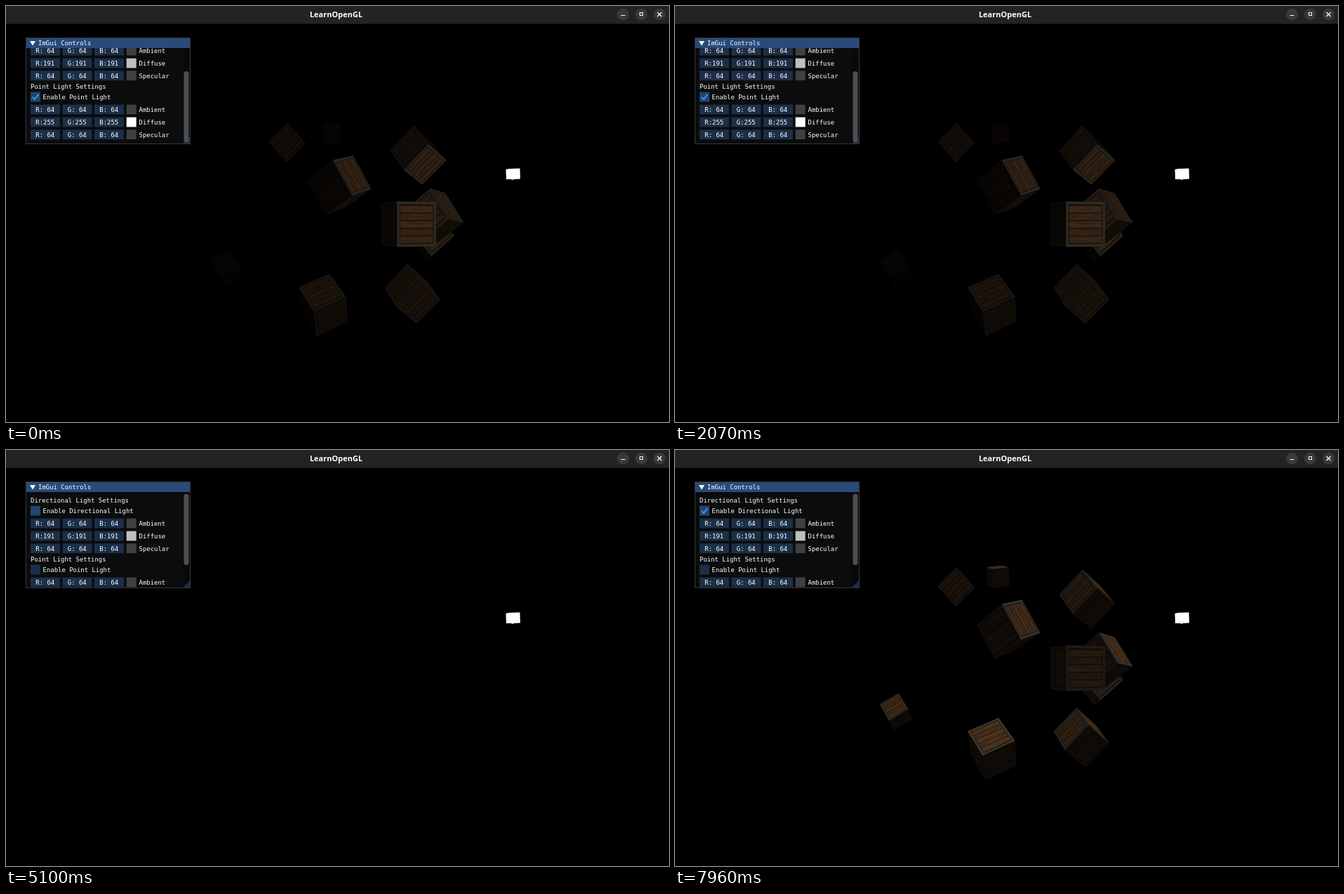
These frames come from a looping animation (945x593 px, 8000 ms). An HTML page with a canvas:

```html
<!DOCTYPE html>
<html>
<head>
<meta charset="utf-8">
<style>
html, body { margin: 0; height: 100%; overflow: hidden; background: #000; }
canvas { display: block; }
</style>
</head>
<body>
<canvas id="stage" width="945" height="593"></canvas>
<script>
const g = document.getElementById('stage').getContext('2d');
const LOOP = 8000;

// Scene: crates at p, each turned 20 degrees more than the one before
const crates = [
  [0, 0, 0], [2, 5, -15], [-1.5, -2.2, -2.5], [-3.8, -2, -12.3], [2.4, -.4, -3.5],
  [-1.7, 3, -7.5], [1.3, -2, -2.5], [1.5, 2, -2.5], [1.5, .2, -1.5], [-1.3, 1, -1.5]
].map((p, i) => ({ p, axes: rotation(i * Math.PI / 9) }));
const lamp = [1.45, 1, 2], sun = unit([.2, 1, .3]);
const yaw = 16 * Math.PI / 180, C = Math.cos(yaw), S = Math.sin(yaw);
const WOOD = [86, 58, 35], STEEL = [72, 66, 57];

function dot(a, b) { return a[0] * b[0] + a[1] * b[1] + a[2] * b[2]; }
function unit(a) { const l = Math.hypot(...a); return a.map(x => x / l); }

// Rotated x, y and z axes of a crate
function rotation(angle) {
  const n = unit([1, .3, .5]), c = Math.cos(angle), s = Math.sin(angle);
  return [0, 1, 2].map(a => {
    const e = [0, 0, 0];
    e[a] = 1;
    const cross = [n[1] * e[2] - n[2] * e[1], n[2] * e[0] - n[0] * e[2], n[0] * e[1] - n[1] * e[0]];
    return e.map((x, i) => c * x + s * cross[i] + (1 - c) * n[a] * n[i]);
  });
}

// Camera space: right, up, depth
const turn = ([x, y, z]) => [x * C + z * S, y, x * S - z * C];
function view(p) {
  const [r, y, d] = turn(p);
  return [r + 1.72, y, d + 11.05];
}
function project(p) {
  const [r, y, d] = view(p);
  return [472.5 + 643 * r / d, 311 - 680 * y / d];
}

function poly(points, color) {
  g.fillStyle = color;
  g.beginPath();
  for (const [x, y] of points) g.lineTo(x, y);
  g.fill();
}

function light(mode, n, at) {
  if (mode === 'sun') return .2 + .75 * Math.max(0, dot(n, sun));
  const to = lamp.map((x, i) => x - at[i]), d = Math.hypot(...to);
  return (.22 + Math.max(0, dot(n, to) / d)) / (1 + .09 * d + .032 * d * d);
}

function drawFace(crate, axis, sign, mode) {
  const n = crate.axes[axis].map(x => x * sign);
  const mid = crate.p.map((x, i) => x + n[i] / 2);
  if (dot(turn(n), view(mid)) >= 0) return;
  const level = light(mode, n, mid);
  const [U, V] = [[1, 2], [0, 2], [0, 1]][axis].map(a => crate.axes[a]);
  const at = (u, v) => project(mid.map((x, i) => x + U[i] * (u - .5) + V[i] * (v - .5)));
  const rect = (u0, v0, u1, v1, tint, k) => poly(
    [at(u0, v0), at(u1, v0), at(u1, v1), at(u0, v1)],
    `rgb(${tint.map(x => Math.round(x * k * level))})`);

  rect(0, 0, 1, 1, STEEL, 1);
  rect(.06, .06, .94, .94, WOOD, .45);
  let seed = 7;
  const rnd = () => (seed = seed * 16807 % 2147483647) / 2147483647;
  for (let i = 0; i < 5; i++) {
    const v = .085 + i * .168;
    rect(.08, v, .92, v + .145, WOOD, [1, .9, 1.08, .94, 1.03][i]);
    for (let j = 0; j < 4; j++) {
      const u = .08 + rnd() * .4, w = .15 + rnd() * .28, y = v + .01 + rnd() * .11;
      rect(u, y, u + w, y + .018, WOOD, j % 2 ? 1.2 : .75);
    }
  }
}

function drawScene(mode) {
  if (mode) {
    const far = crates.slice().sort((a, b) => view(b.p)[2] - view(a.p)[2]);
    for (const crate of far)
      for (let axis = 0; axis < 3; axis++)
        for (const sign of [-1, 1]) drawFace(crate, axis, sign, mode);
  }
  poly([[712.5, 233], [717, 232], [732.5, 231.5], [733, 246.5], [724, 247], [722, 248], [720, 247], [713, 247]], '#fff');
}

function box(x, y, w, h, color) {
  g.fillStyle = color;
  g.fillRect(x, y, w, h);
}
function text(s, x, y, color = '#fff') {
  g.fillStyle = color;
  g.fillText(s, x, y);
}
function line(points, color, width) {
  g.strokeStyle = color;
  g.lineWidth = width;
  g.beginPath();
  for (const [x, y] of points) g.lineTo(x, y);
  g.stroke();
}

function drawTitleBar() {
  box(0, 0, 945, 25.5, '#222322');
  g.font = 'bold 11px "Noto Sans", "Open Sans", sans-serif';
  g.textAlign = 'center';
  text('LearnOpenGL', 470.5, 16);
  g.textAlign = 'left';
  for (const x of [879.5, 905.5, 931.5]) {
    g.fillStyle = '#383938';
    g.beginPath();
    g.arc(x, 12, 8.5, 0, 7);
    g.fill();
  }
  box(876.5, 13, 6, 1, '#fff');
  g.strokeStyle = '#fff';
  g.lineWidth = 1;
  g.strokeRect(903.5, 9.5, 4, 4);
  line([[928.5, 9], [934.5, 15]], '#fff', 1.2);
  line([[934.5, 9], [928.5, 15]], '#fff', 1.2);
}

function colorRow(y, value, label) {
  'RGB'.split('').forEach((ch, i) => {
    const x = 35 + i * 45.5;
    box(x, y - 7.4, 42, 13.8, '#1c2f48');
    text(ch + ':' + String(value).padStart(3), x + 7.3, y + 3);
  });
  box(171.7, y - 7.4, 14, 13.8, `rgb(${value},${value},${value})`);
  text(label, 189.5, y + 3);
}

function checkbox(y, on, hover, label) {
  box(35, y - 7.4, 14, 14, hover ? '#23446c' : '#1c2f48');
  if (on) line([[37.8, y - .2], [40.8, y + 3], [46.4, y - 3.8]], '#4296fa', 1.9);
  text(label, 52.5, y + 3);
}

function lightGroup(y, name, diffuse, on, hover) {
  text(name + ' Light Settings', 35, y + 3);
  checkbox(y + 15, on, hover, `Enable ${name} Light`);
  colorRow(y + 33, 64, 'Ambient');
  colorRow(y + 51, diffuse, 'Diffuse');
  colorRow(y + 68.7, 64, 'Specular');
}

function drawPanel(s) {
  box(28, 45, 235, 152, '#36373a');
  box(29, 46, 233, 150, '#0b0c0d');
  box(29, 46, 233, 14, '#294a7a');
  poly([[34, 50], [42, 50], [38, 56.5]], '#fff');
  g.font = '8.95px "DejaVu Sans Mono", "Liberation Mono", monospace';
  text('ImGui Controls', 46, 56);

  g.save();
  g.beginPath();
  g.rect(29, 60, 233, 136);
  g.clip();
  lightGroup(72 - s.scroll, 'Directional', 191, s.sun, s.sunHover);
  lightGroup(156 - s.scroll, 'Point', 255, s.lamp, s.lampHover);
  box(252, 60, 10, 136, '#090909');
  poly([[262, 186], [262, 196], [252, 196]], '#14304c');
  g.fillStyle = '#4f4f4f';
  g.beginPath();
  g.roundRect(253.5, 62.5 + s.scroll * 30.5 / 41, 7, 101.5, 3.5);
  g.fill();
  g.restore();
}

function state(t) {
  const k = Math.min(1, Math.max(0, (t - 4500) / 550));
  return {
    scroll: 41 * (1 - k * k * (3 - 2 * k)),
    lamp: t < 2310 || t >= 2910 && t < 3620,
    sun: t >= 6290,
    lampHover: t < 4130,
    sunHover: t >= 4950
  };
}

function draw() {
  const s = state(performance.now() % LOOP);
  box(0, 0, 945, 593, '#000');
  drawScene(s.sun ? 'sun' : s.lamp ? 'lamp' : null);
  drawTitleBar();
  drawPanel(s);
  requestAnimationFrame(draw);
}
draw();
</script>
</body>
</html>
```
